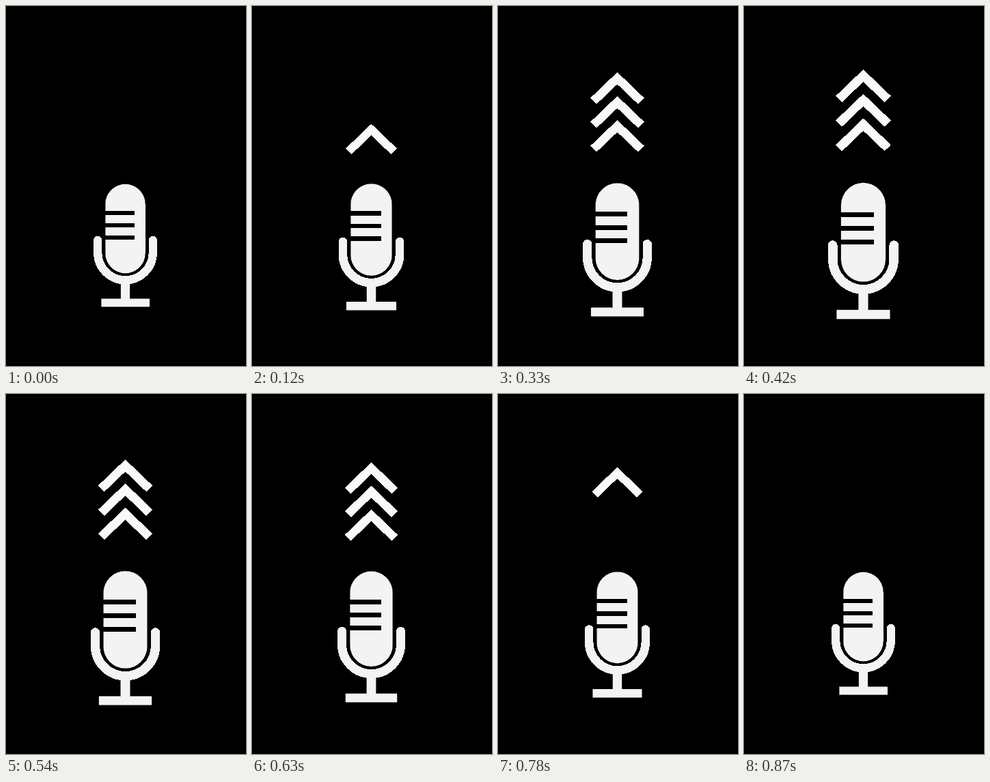
An HTML page that plays this animation: 351 by 527 pixels, repeating every 900 ms.

```html
<!DOCTYPE html>
<html lang="en">
<head>
<meta charset="utf-8">
<title>Microphone</title>
<style>
  html, body { margin: 0; width: 100%; height: 100%; overflow: hidden; background: #000; }
  svg { display: block; width: 100%; height: 100%; shape-rendering: crispEdges; }
</style>
</head>
<body>
<svg viewBox="0 0 351 527">
  <defs>
    <path id="chevron" d="M0 0L35.6 34.2L28 41.7L0 14.9L-28 41.7L-35.6 34.2Z"/>
  </defs>
  <g id="art" fill="#f3f3f3" stroke="#f3f3f3" stroke-width="0.6" stroke-linejoin="round">
    <g id="arrows" fill="#f9f9f9" stroke="#f9f9f9" stroke-width="1">
      <use href="#chevron" y="-101.5"/>
      <use href="#chevron" y="-133.8"/>
      <use href="#chevron" y="-166"/>
    </g>
    <rect x="-29" y="-17" width="58" height="130" rx="29"/>
    <path d="M-30 21.5H13.8v6.2H-30zM-30 39.5H13.8v6.2H-30zM-30 57.5H13.8v6.2H-30z" fill="#000" stroke="none"/>
    <path d="M-40.3 64.9V83A40.3 40.3 0 0 0 40.3 83V64.9" fill="none" stroke-width="12.2" stroke-linecap="round"/>
    <path d="M-6.2 126H6.2V150.6H35V162.1H-35V150.6H-6.2Z"/>
  </g>
</svg>
<script>
  const LOOP = 900, STEP = 30, PEAK = 450, END = 870, GROW = 0.118;
  const visible = [[60, 660], [150, 750], [240, 840]];
  const art = document.getElementById('art');
  const arrows = [...document.getElementById('arrows').children];

  function draw(now) {
    // The motion advances in 30 ms steps.
    const t = Math.floor((now % LOOP) / STEP) * STEP;
    const k = t < PEAK ? t / PEAK : (END - t) / (END - PEAK);
    art.setAttribute('transform', `translate(174.5 278) scale(${1 + GROW * k})`);
    arrows.forEach((arrow, i) => {
      const [on, off] = visible[i];
      arrow.style.display = t >= on && t < off ? '' : 'none';
    });
  }

  const start = performance.now();
  function tick() {
    draw(performance.now() - start);
    requestAnimationFrame(tick);
  }
  tick();
</script>
</body>
</html>
```
